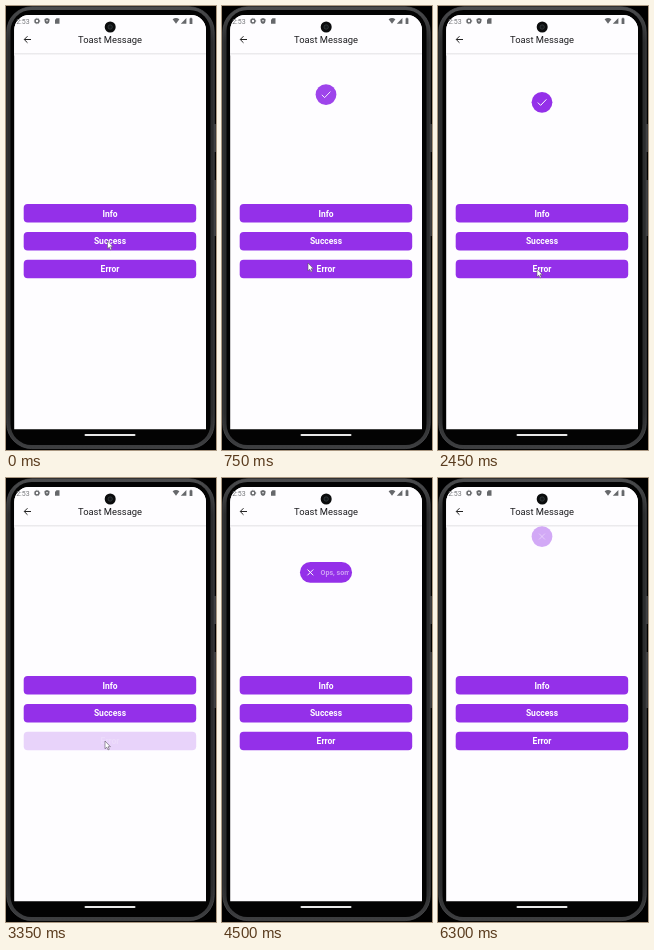
An HTML page that plays this animation: 210 px wide and 444 px high, repeating every 6350 ms.

```html
<!DOCTYPE html>
<html lang="en">
<head>
<meta charset="utf-8">
<title>Toast Message</title>
<style>
  html, body { margin: 0; width: 100%; height: 100%; overflow: hidden; background: #000; }
  #stage { display: block; width: 100%; height: 100%; }
  text { font-family: Roboto, sans-serif; }
  .label { font-size: 8.5px; font-weight: 700; fill: #fff; text-anchor: middle; }
</style>
</head>
<body>
<svg id="stage" viewBox="0 0 210 444">
  <defs>
    <linearGradient id="shade" x2="0" y2="1">
      <stop offset="0" stop-color="#e6e5e8"/>
      <stop offset="1" stop-color="#fefdff"/>
    </linearGradient>
    <linearGradient id="metal" x2="0" y2="1">
      <stop offset="0" stop-color="#4c4d4f"/>
      <stop offset=".08" stop-color="#2b2c2d"/>
      <stop offset=".92" stop-color="#2b2c2d"/>
      <stop offset="1" stop-color="#3e3f41"/>
    </linearGradient>
  </defs>

  <!-- phone body -->
  <rect width="210" height="444"/>
  <path d="M209 118v28M209 174v56" stroke="#38393b" stroke-width="2"/>
  <rect x=".8" y=".8" width="207.4" height="441.8" rx="25" fill="url(#metal)" stroke="#4a4b4d" stroke-width=".8"/>
  <rect x="4.5" y="4" width="200" height="435" rx="21" fill="#030303"/>
  <path d="M8.2 423.3V24a15 15 0 0 1 15-15H185a15 15 0 0 1 15 15V423.3z" fill="#fefdff"/>
  <rect x="78.5" y="428" width="51" height="2" rx="1" fill="#e8e8e8"/>

  <rect x="8.2" y="47" width="191.8" height="2.5" fill="url(#shade)"/>

  <g id="buttons"></g>

  <g id="toast">
    <rect id="pill" y="-10.4" height="20.8" rx="10.4" fill="#9430e9"/>
    <svg id="clip" y="-10.4" height="20.8" overflow="hidden">
      <text id="message" x="20.6" y="13" font-size="7.1" font-weight="700" fill="#fff"></text>
    </svg>
    <path id="icon" fill="none" stroke="#fff" stroke-width="1"/>
  </g>

  <!-- status bar and header cover the toast -->
  <path d="M8.2 47V24a15 15 0 0 1 15-15H185a15 15 0 0 1 15 15V47z" fill="#fefdff"/>
  <g fill="#66686b">
    <text x="10.2" y="17.6" font-size="7" fill="#77797c">2:53</text>
    <circle cx="31" cy="15" r="1.9" fill="none" stroke="#66686b" stroke-width="1.4"/>
    <circle cx="31" cy="15" r="2.7" fill="none" stroke="#66686b" stroke-width=".6" stroke-dasharray="1.1 1.1"/>
    <path d="M41 11.9l2.5 1v2q0 2.2-2.5 3.2q-2.5-1-2.5-3.2v-2z"/>
    <circle cx="41" cy="14.8" r=".8" fill="#fefdff"/>
    <path d="M50.5 12.2h3v5.5h-4.5v-4z"/>
    <path d="M166.6 13.2q3.4-2.5 6.8 0L170 17.8z"/>
    <path d="M180.4 12v5.8h-5.6z"/>
    <path d="M183.6 12.6h.7v-.8h1.4v.8h.7v5.3h-2.8z"/>
  </g>
  <circle cx="104.2" cy="21" r="5.5" fill="#0b0c0d"/>
  <circle cx="104.2" cy="21" r="2.2" fill="#15191b" stroke="#3c4346" stroke-width=".7"/>
  <path d="M25 33.5h-6.6M21.5 30.2l-3.3 3.3l3.3 3.3" fill="none" stroke="#222" stroke-width="1"/>
  <text x="104" y="37" font-size="9.4" fill="#1d1d20" text-anchor="middle">Toast Message</text>

  <path id="cursor" d="M0 0v7.8l1.8-1.6l1.2 2.7l1.3-.6l-1.2-2.6h2.3z" fill="#fff" stroke="#5a5262" stroke-width=".6" stroke-linejoin="round"/>
</svg>
<script>
const LOOP = 6350, MID = 104, REST = 94.4, RISE = 60, SIZE = 20.8;
const $ = id => document.getElementById(id);
const clamp = v => Math.min(1, Math.max(0, v));
const mix = (a, b, k) => a + (b - a) * k;
const span = (t, start, length) => clamp((t - start) / length);
const inOut = k => k * k * (3 - 2 * k);
const inBack = k => k * k * (2.7 * k - 1.7);

$('buttons').innerHTML = ['Info', 'Success', 'Error'].map((name, i) =>
  `<g transform="translate(0 ${198 + i * 27.9})">
    <rect x="17.7" width="172.5" height="18.5" rx="4" fill="#9430e9"/>
    <text class="label" x="${MID}" y="12.5">${name}</text>
  </g>`).join('');
const buttons = $('buttons').children;

const toasts = [
  { at: 0, text: 'Success', width: 51, icon: 'M-4.2 .2l2.8 2.8l5.8-6' },
  { at: 3450, text: 'Ops, something is wrong!', width: 109, icon: 'M-2.9-2.9l5.8 5.8M2.9-2.9l-5.8 5.8' }
];

// time, x, y of the pointer tip
const path = [
  [0, 101.5, 235], [250, 101.5, 235], [600, 88, 256], [750, 86, 257],
  [1300, 98, 262], [1600, 99, 263], [3550, 99, 263], [3900, 40, 264], [4050, 18, 265]
];

function drawPress(button, t, down, up) {
  const shown = t < down ? 1 : mix(0.2, 1, inOut(span(t, up, 250)));
  button.setAttribute('opacity', shown);
  button.lastElementChild.setAttribute('opacity', shown);
}

function drawToast(t) {
  const toast = toasts[t < 3450 ? 0 : 1];
  const s = t - toast.at;
  const shown = inOut(span(s, 250, 620)) - inBack(span(s, 2364, 540));
  const open = inOut(span(s, 850, 500)) - inOut(span(s, 1900, 500));
  const width = mix(SIZE, toast.width, open), left = -width / 2;
  $('toast').setAttribute('transform', `translate(${MID} ${REST - RISE * (1 - shown)})`);
  $('toast').setAttribute('opacity', clamp(shown));
  for (const id of ['pill', 'clip']) {
    $(id).setAttribute('x', left);
    $(id).setAttribute('width', id === 'pill' ? width : Math.max(0, width - 3));
  }
  $('message').textContent = toast.text;
  $('message').setAttribute('opacity', clamp(open * 1.5));
  $('icon').setAttribute('d', toast.icon);
  $('icon').setAttribute('opacity', clamp(shown));
  $('icon').setAttribute('transform', `translate(${left + SIZE / 2} 0)`);
}

function drawCursor(t) {
  const next = path.findIndex(p => p[0] > t);
  $('cursor').setAttribute('visibility', next < 0 ? 'hidden' : 'visible');
  if (next < 0) return;
  const a = path[next - 1], b = path[next];
  const k = inOut(span(t, a[0], b[0] - a[0]));
  $('cursor').setAttribute('transform', `translate(${mix(a[1], b[1], k)} ${mix(a[2], b[2], k)})`);
}

function draw(t) {
  drawPress(buttons[1], t, 50, 100);
  drawPress(buttons[2], t, 3350, 3500);
  drawToast(t);
  drawCursor(t);
}

const begin = performance.now();
function tick() {
  draw((performance.now() - begin) % LOOP);
  requestAnimationFrame(tick);
}
tick();
</script>
</body>
</html>
```
